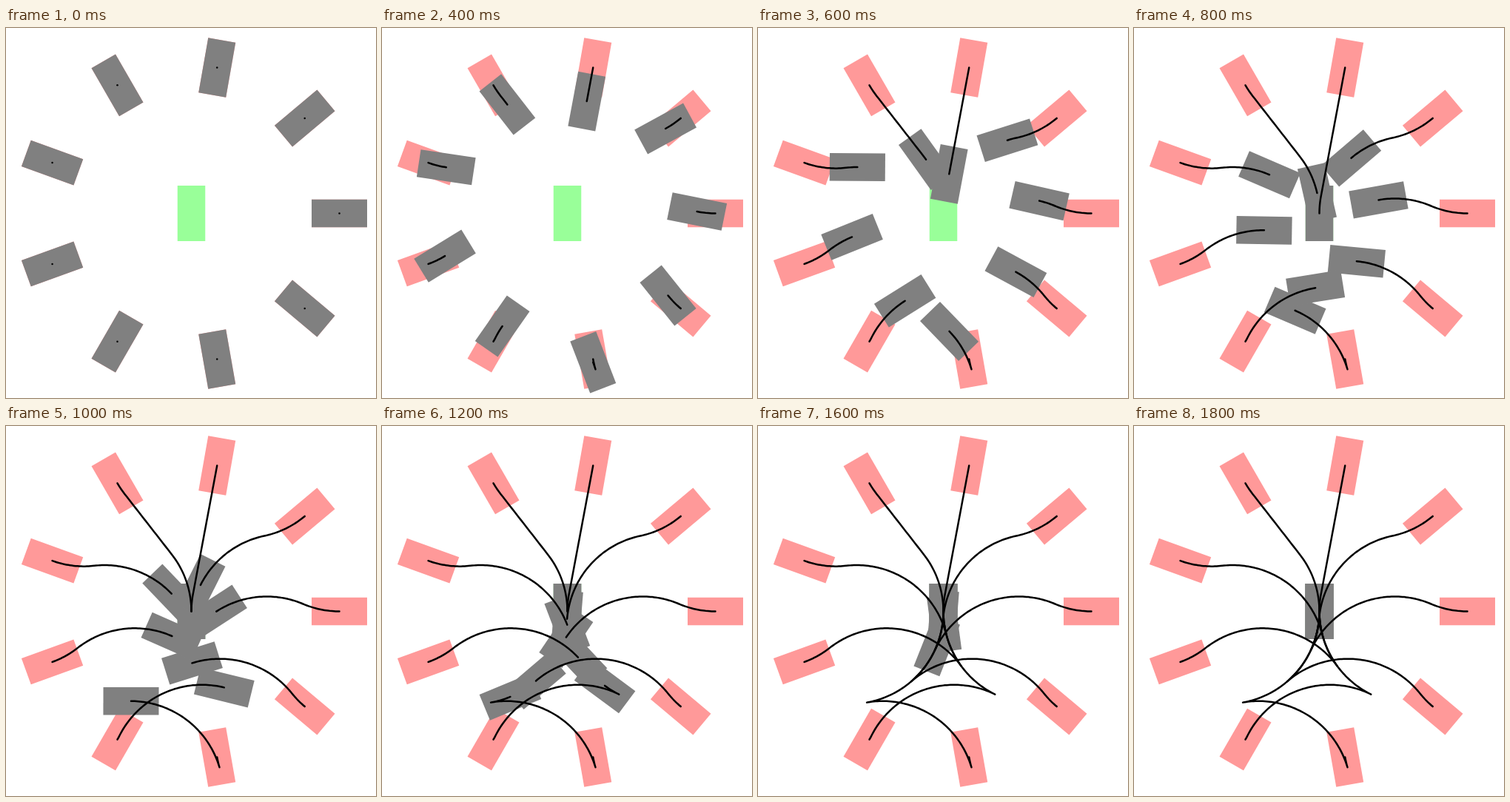
Write an HTML page with a canvas that moves like this. It is 500x500 px and loops after 2600 ms.

```html
<!DOCTYPE html>
<html lang="en">
<head>
<meta charset="utf-8">
<title>Parking paths</title>
<style>
  html, body { margin: 0; width: 100%; height: 100%; overflow: hidden; background: #fff; }
  canvas { display: block; }
</style>
</head>
<body>
<canvas id="stage" width="500" height="500"></canvas>
<script>
const ctx = document.getElementById('stage').getContext('2d');
const { PI, sin, cos, atan2, hypot, sqrt, abs, sign, ceil, floor, min } = Math;

const MID = 250.5, RING = 200, RADIUS = 125;
const LENGTH = 75, WIDTH = 37.5;
const TURN_STEP = 0.02, LINE_STEP = 5, STEPS_PER_TICK = 10;
const LOOP = 2600, HOLD = 400, TICK = 100, LAST_TICK = 15;

const goal = { x: MID, y: MID, h: PI / 2 };
const wrap = a => a - 2 * PI * Math.round(a / (2 * PI));

// Centre of the turning circle; side is 1 for right, -1 for left.
const centre = (p, side) => ({
  x: p.x - RADIUS * side * sin(p.h),
  y: p.y + RADIUS * side * cos(p.h)
});

// A segment with side 0 is straight; otherwise size is the change of heading.
const cost = path => path.reduce((sum, s) => sum + abs(s.size) * (s.side ? RADIUS : 1), 0);

// Turn, straight line, turn to the other side.
function turnLineTurn(start, side) {
  const a = centre(start, side), b = centre(goal, -side);
  const dx = b.x - a.x, dy = b.y - a.y, d = hypot(dx, dy);
  if (d < 2 * RADIUS) return [];
  const line = sqrt(d * d - 4 * RADIUS * RADIUS);
  const h = atan2(dy, dx) + side * atan2(2 * RADIUS, line);
  return [[
    { side, size: wrap(h - start.h) },
    { side: 0, size: line },
    { side: -side, size: wrap(goal.h - h) }
  ]];
}

// Three touching circles, in either gear.
function threeTurns(start, side) {
  const a = centre(start, side), b = centre(goal, side);
  const dx = b.x - a.x, dy = b.y - a.y, d = hypot(dx, dy);
  if (d > 4 * RADIUS) return [];
  const off = sqrt(4 * RADIUS * RADIUS - d * d / 4) / d;
  return [off, -off].map(k => {
    const mx = (a.x + b.x) / 2 - k * dy, my = (a.y + b.y) / 2 + k * dx;
    const touch = c => atan2(side * (c.y - my), side * (c.x - mx)) - PI / 2;
    const h1 = touch(a), h2 = touch(b);
    return [
      { side, size: wrap(h1 - start.h) },
      { side: -side, size: wrap(h2 - h1) },
      { side, size: wrap(goal.h - h2) }
    ];
  });
}

function move(p, side, size) {
  if (!side) return { x: p.x + size * cos(p.h), y: p.y + size * sin(p.h), h: p.h };
  const c = centre(p, side), h = p.h + size;
  return { x: c.x + RADIUS * side * sin(h), y: c.y - RADIUS * side * cos(h), h };
}

function samplePath(start, path) {
  const poses = [start];
  let from = start;
  for (const { side, size } of path) {
    const step = side ? TURN_STEP : LINE_STEP;
    const count = ceil(abs(size) / step);
    for (let i = 1; i <= count; i++) {
      poses.push(move(from, side, sign(size) * min(i * step, abs(size))));
    }
    from = poses[poses.length - 1];
  }
  return poses;
}

const cars = Array.from({ length: 9 }, (_, i) => {
  const a = i * 2 * PI / 9;
  const start = { x: MID + RING * cos(a), y: MID + RING * sin(a), h: a + PI };
  const paths = [1, -1].flatMap(s => [...turnLineTurn(start, s), ...threeTurns(start, s)]);
  return samplePath(start, paths.reduce((p, q) => cost(q) < cost(p) ? q : p));
});

function drawCar(p, color) {
  ctx.save();
  ctx.translate(p.x, p.y);
  ctx.rotate(p.h);
  ctx.fillStyle = color;
  ctx.fillRect(-LENGTH / 2, -WIDTH / 2, LENGTH, WIDTH);
  ctx.restore();
}

function drawTrail(poses, end) {
  ctx.beginPath();
  ctx.moveTo(poses[0].x, poses[0].y);
  for (let i = 0; i <= end; i++) ctx.lineTo(poses[i].x, poses[i].y);
  ctx.stroke();
}

function draw(time) {
  const tick = time < HOLD ? 0 : min(LAST_TICK, floor((time - HOLD) / TICK) + 1);
  const reached = poses => min(tick * STEPS_PER_TICK, poses.length - 1);

  ctx.fillStyle = '#fff';
  ctx.fillRect(0, 0, 500, 500);
  cars.forEach(poses => drawCar(poses[0], '#f99'));
  drawCar(goal, '#9f9');
  cars.forEach(poses => drawCar(poses[reached(poses)], '#808080'));

  ctx.strokeStyle = '#000';
  ctx.lineWidth = 2.5;
  ctx.lineCap = ctx.lineJoin = 'round';
  cars.forEach(poses => drawTrail(poses, reached(poses)));
}

function frame() {
  draw(performance.now() % LOOP);
  requestAnimationFrame(frame);
}
frame();
</script>
</body>
</html>
```
